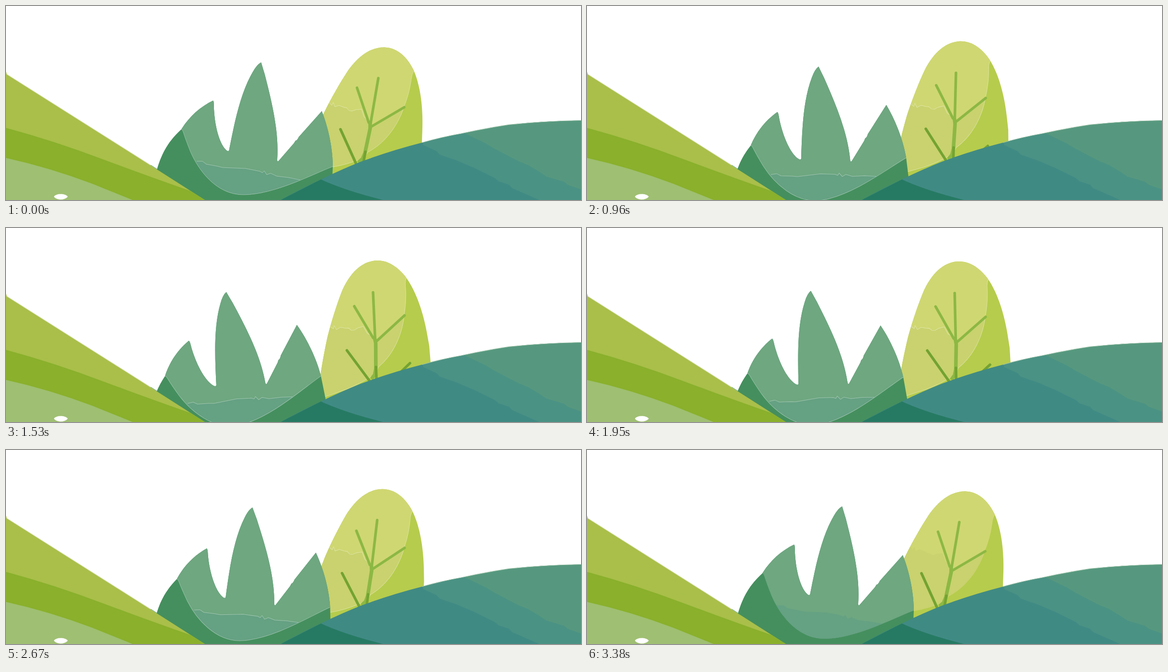
An HTML page that plays this animation: 1200 by 406 pixels, repeating every 3490 ms.

```html
<!DOCTYPE html>
<html lang="en">
<head>
<meta charset="utf-8">
<title>Swaying hills</title>
<style>
  html, body { margin: 0; width: 100%; height: 100%; overflow: hidden; background: #fff; }
  svg { display: block; width: 100%; height: 100%; }
  .seam { fill: none; stroke: #fff; stroke-opacity: .36; stroke-width: 1; }
  .branch { fill: none; stroke-linecap: round; stroke-linejoin: round; }
</style>
</head>
<body>
<svg viewBox="0 0 1200 406">
  <defs>
    <path id="treeShape" d="M625 400L632 300Q645 265 663 225C676 198 697 160 716 132C740 100 765 86 790 86.5C818 87.5 838 108 851 135C866 170 870 215 869 255L868 285L862 330L850 400Z"/>
    <path id="treeLight" d="M852 135Q847 142 846 152C843 175 838 192 831 210C820 245 795 285 755 306Q752 312 741 320Q715 331 682 337L620 345V60H852Z"/>
    <path id="bushShape" d="M300 400Q306 365 315 342C326 305 340 282 366 258C382 232 405 211 432 198C434 199 434 205 434 215C436 255 446 288 459 301Q464 306 465.5 302C477.5 240 490 181 515 138Q524 122 532.5 118Q536 130 540 143C556 205 570 265 566 322Q566 327 569 324L601 287L604 282Q608 281 611 274L659 220C673 255 682 300 682 336L680 384L640 470H330Z"/>
    <path id="bushLight" d="M366 258Q368 258 370 264Q375 280 385 305C400 340 437 395 495 395C560 395 640 352 682 336H720V80H366Z"/>
    <path id="hill" d="M573 406Q620 380 657 363Q700 342 740 326Q805 302 868 286Q910 274 950 267Q1000 256 1050 248.4Q1120 240.8 1200 239.5V406Z"/>
    <clipPath id="treeClip"><use href="#treeShape"/></clipPath>
    <clipPath id="treeLightClip"><use href="#treeLight"/></clipPath>
    <clipPath id="bushClip"><use href="#bushShape"/></clipPath>
    <clipPath id="bushLightClip"><use href="#bushLight"/></clipPath>
    <clipPath id="hillClip"><use href="#hill"/></clipPath>
  </defs>

  <g id="tree">
    <use href="#treeShape" fill="#b6cc4c"/>
    <g clip-path="url(#treeClip)">
      <use href="#treeLight" fill="#cfd772"/>
      <g clip-path="url(#treeLightClip)">
        <path fill="#c9d26e" d="M620 203H675L680 208L683 202L686 211L695 208L705 212L722 220L730 217L742 216L747 232L757 243L762 252L835 210V345H620Z"/>
        <path class="seam" d="M675 203L680 208L683 202L686 211L695 208L705 212L711 213L716 219L722 220L730 217L742 216L747 232L754 238"/>
      </g>
      <use href="#treeLight" class="seam"/>
    </g>
    <g class="branch" stroke="#8cb844">
      <path stroke-width="5.5" d="M777 151L761 245M732.5 171L757 244M831 212L763 252"/>
      <path stroke-width="7.5" d="M760 246V256L749 308L744 320L738 325"/>
    </g>
    <path class="branch" stroke="#73a332" stroke-width="5.5" d="M698 258L731 331L747 365M750 305L743 345M821 312L760 350"/>
  </g>

  <g id="bush">
    <use href="#bushShape" fill="#458f5e"/>
    <g clip-path="url(#bushClip)">
      <use href="#bushLight" fill="#6ea780"/>
      <g clip-path="url(#bushLightClip)">
        <path fill="#65a183" d="M380 325H410L418 331L440 335L452 338L500 340L530 346L535 349L539 345L544 353L552 350L565 356L590 359L620 364L700 420H380Z"/>
        <path class="seam" d="M398 325H410L418 331L440 335L452 338L500 340L530 346L535 349L539 345L544 353L552 350L565 356L590 359L614 364"/>
      </g>
      <use href="#bushLight" class="seam"/>
    </g>
  </g>

  <use href="#hill" fill="#408a84"/>
  <g clip-path="url(#hillClip)">
    <path fill="#4a9284" d="M868 280L871 291L899 304L905 311L940 323L980 340L1020 360L1028 367L1050 374L1056 381L1113 406H1200V230H950Z"/>
    <path fill="#56987f" d="M945 260L965 270L1000 287L1020 299L1070 325L1090 333L1110 345L1128 357L1165 368L1172 374L1200 384V230Z"/>
    <path fill="#267a63" d="M573 406L657 363Q710 387 787 406Z"/>
  </g>
  <path fill="none" stroke="#9dc3aa" stroke-width="1.2" d="M868 286Q910 274 950 267Q1000 256 1050 248.4Q1120 240.8 1200 239.5"/>

  <path fill="none" stroke="#458f5e" d="M302 333L316 342"/>
  <path fill="#a9bf49" d="M0 137L2 143.4L315 342L415 406H0Z"/>
  <path fill="none" stroke="#d3dbaa" d="M1 142.3L302 333"/>
  <path fill="#8ab02c" d="M0 255Q100 282 200 320Q310 361 385 387L415 406H0Z"/>
  <path fill="#9fbf72" d="M0 318Q90 338 180 372L264 406H0Z"/>
  <path fill="#fff" d="M100 399Q104 393 116 393.5Q125 394 129 399Q124 405 113 405Q103 404 100 399Z"/>
</svg>
<script>
const LOOP = 3490;
const STEP = 63.5;      // the picture changes about 16 times a second
const LEAD = 12;        // tolerance for uneven frame lengths
const SEAMS_END = 3360;

const tree = document.getElementById('tree');
const bush = document.getElementById('bush');
const seams = document.querySelectorAll('.seam');

const ease = (t, from, to) => {
  const x = Math.min(1, Math.max(0, (t - from) / (to - from)));
  return (1 - Math.cos(Math.PI * x)) / 2;
};
const sway = t => ease(t, 80, 1510) - ease(t, 1560, 3210);
const turn = (part, angle, x, y) =>
  part.setAttribute('transform', `rotate(${angle} ${x} ${y})`);

function draw() {
  const now = performance.now() % LOOP;
  const t = Math.floor((now + LEAD) / STEP) * STEP;
  const lean = sway(t);
  turn(tree, -12.2 * lean, 695.7, 194.2);
  turn(bush, -13.9 * lean, 562.2, 424.5);
  seams.forEach(seam => { seam.style.visibility = t < SEAMS_END ? 'visible' : 'hidden'; });
  requestAnimationFrame(draw);
}
draw();
</script>
</body>
</html>
```
